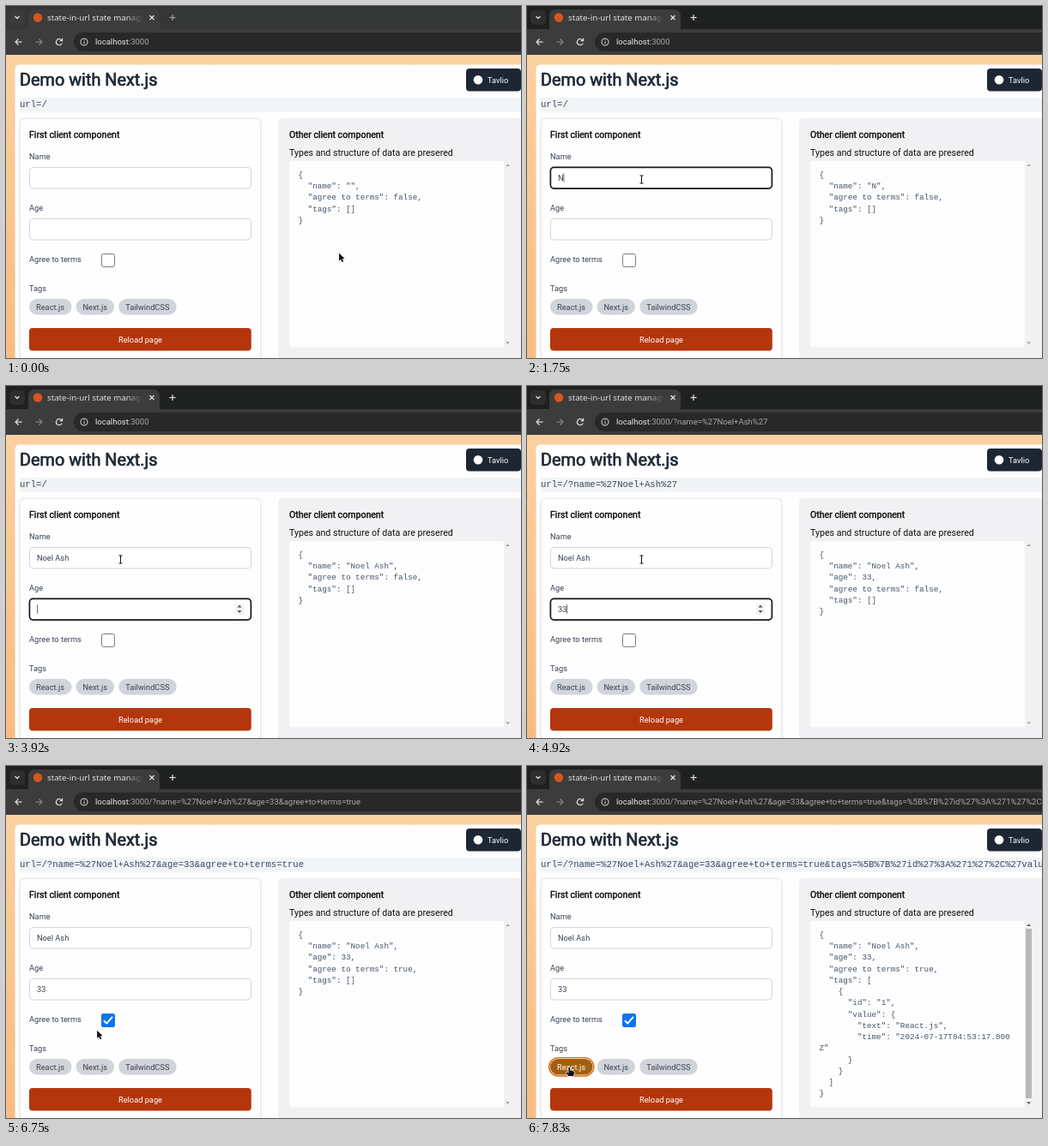
These frames come from a looping animation (600 by 411 pixels, 8000 ms). An HTML page with a canvas:

```html
<!DOCTYPE html>
<html lang="en">
<head>
<meta charset="utf-8">
<title>State in URL demo</title>
<style>
html, body { margin: 0; width: 100%; height: 100%; overflow: hidden; background: #fff; }
canvas { display: block; width: 600px; height: 411px; }
</style>
</head>
<body>
<canvas id="stage"></canvas>
<script>
const LOOP = 8000, STEP = 1000 / 12;
const SANS = 'Roboto, sans-serif', MONO = '"Liberation Mono", monospace';
const INK = '#374151', SLATE = '#475569';
const PERSON = 'Noel Ash';
const NAME_KEYS = [21, 23, 26, 32, 37, 40, 42, 44];
const AGE_KEYS = [55, 57];

// Pointer path: step, x, y
const PATH = [
  [0, 388, 288.4], [6, 156, 211], [7, 156, 211], [9, 133.5, 202.6], [63, 133.5, 202.6],
  [67, 128, 261], [69, 128, 261], [71, 123, 285], [72, 123, 285], [73, 120, 298],
  [79, 120, 298], [86, 50, 352]
];

const canvas = document.getElementById('stage');
const ctx = canvas.getContext('2d');
const ratio = window.devicePixelRatio || 1;
canvas.width = Math.round(600 * ratio);
canvas.height = Math.round(411 * ratio);

function box(x, y, w, h, r, fill, stroke, line = 1) {
  ctx.beginPath();
  ctx.roundRect(x, y, w, h, r);
  if (fill) { ctx.fillStyle = fill; ctx.fill(); }
  if (stroke) { ctx.strokeStyle = stroke; ctx.lineWidth = line; ctx.stroke(); }
}

function disc(x, y, r, fill) {
  ctx.beginPath();
  ctx.arc(x, y, r, 0, 7);
  ctx.fillStyle = fill;
  ctx.fill();
}

function text(str, x, y, size, color, family = SANS) {
  ctx.font = `${size}px ${family}`;
  ctx.fillStyle = color;
  ctx.fillText(str, x, y);
}

// Bold made by thickening the regular outlines
function boldText(str, x, y, size, color) {
  text(str, x, y, size, color);
  ctx.strokeStyle = color;
  ctx.lineWidth = size / 27;
  ctx.lineJoin = 'round';
  ctx.strokeText(str, x, y);
}

function lines(points, color, width = 1.2) {
  ctx.beginPath();
  points.forEach(([x, y], i) => i ? ctx.lineTo(x, y) : ctx.moveTo(x, y));
  ctx.strokeStyle = color;
  ctx.lineWidth = width;
  ctx.stroke();
}

function triangle(x, y, half, rise, color) {
  ctx.beginPath();
  ctx.moveTo(x - half, y);
  ctx.lineTo(x + half, y);
  ctx.lineTo(x, y - rise);
  ctx.fillStyle = color;
  ctx.fill();
}

function pointerAt(k) {
  const i = PATH.findIndex(p => p[0] > k);
  if (i < 0) return PATH[PATH.length - 1].slice(1);
  const [k0, x0, y0] = PATH[i - 1], [k1, x1, y1] = PATH[i];
  const u = (k - k0) / (k1 - k0), e = u * u * (3 - 2 * u);
  return [x0 + (x1 - x0) * e, y0 + (y1 - y0) * e];
}

function stateAt(k) {
  const typed = keys => keys.filter(s => s <= k).length;
  const name = PERSON.slice(0, typed(NAME_KEYS));
  const age = '33'.slice(0, typed(AGE_KEYS));
  const agreed = k >= 76, picked = k >= 88;
  const data = { name };
  if (age) data.age = +age;
  data['agree to terms'] = agreed;
  data.tags = picked
    ? [{ id: '1', value: { text: 'React.js', time: '2024-07-17T04:53:17.000Z' } }]
    : [];
  let query = '';
  if (k >= 50) query += `/?name=%27${PERSON.replace(' ', '+')}%27`;
  if (k >= 78) query += '&age=33&agree+to+terms=true';
  if (k >= 91) query += '&tags=%5B%7B%27id%27%3A%271%27%2C%27value%27%3A%7B%27text%27';
  return {
    name, age, agreed, picked, data, query,
    active: k >= 10,
    focus: k < 10 || k >= 75 ? '' : k < 47 ? 'name' : 'age',
    caret: !(k >= 16 && k < 21) && !(k >= 64 && k < 70),
    pressed: k >= 87
  };
}

function drawBrowser({ query, active }) {
  const icon = active ? '#e3e3e3' : '#a3a3a3';
  ctx.fillStyle = active ? '#1f2020' : '#353636';
  ctx.fillRect(0, 0, 600, 28);
  ctx.fillStyle = '#3c3c3c';
  ctx.fillRect(0, 27, 600, 30);
  box(4, 5, 18, 17, 5, active ? '#2d2e2e' : '#3a3b3b');
  lines([[10.5, 12], [13, 14.5], [15.5, 12]], '#e3e3e3');
  box(26, 4, 153, 26, [7, 7, 0, 0], '#3c3c3c');
  disc(37, 13.5, 5.2, '#d8551f');

  const fade = ctx.createLinearGradient(140, 0, 159, 0);
  fade.addColorStop(0, '#e0e0e0');
  fade.addColorStop(1, 'rgba(224,224,224,0)');
  text('state-in-url state manage', 48, 17, 9.7, fade, '"Noto Sans", sans-serif');
  lines([[167.5, 11], [172.5, 16]], '#e3e3e3');
  lines([[172.5, 11], [167.5, 16]], '#e3e3e3');
  lines([[190.5, 13.5], [197.5, 13.5]], icon);
  lines([[194, 10], [194, 17]], icon);

  lines([[18.5, 42], [11, 42]], '#e3e3e3');
  lines([[14.5, 38.5], [11, 42], [14.5, 45.5]], '#e3e3e3');
  lines([[34.5, 42], [42, 42]], '#858585');
  lines([[38.5, 38.5], [42, 42], [38.5, 45.5]], '#858585');
  ctx.beginPath();
  ctx.arc(62, 42, 3.5, 0.4, 5.6);
  ctx.strokeStyle = '#e3e3e3';
  ctx.lineWidth = 1.2;
  ctx.stroke();
  lines([[65.6, 37.8], [65.6, 40.7], [62.7, 40.7]], '#e3e3e3');

  box(79, 31, 540, 22, 11, '#282828');
  box(87, 38, 8, 8, 4, null, '#d0d0d0', 1.1);
  lines([[91, 41.5], [91, 44.2]], '#d0d0d0', 1.1);
  lines([[91, 39.6], [91, 40.6]], '#d0d0d0', 1.1);
  text('localhost', 104, 45.3, 9.5, '#e8e8e8');
  text(':3000' + query, 104 + ctx.measureText('localhost').width, 45.3, 9.5, '#a8a8a8');
}

function drawPage(query) {
  const peach = ctx.createLinearGradient(0, 58, 0, 411);
  peach.addColorStop(0, '#fbd1a1');
  peach.addColorStop(1, '#f7bc82');
  ctx.fillStyle = peach;
  ctx.fillRect(0, 57, 600, 354);
  box(10.6, 68.5, 620, 380, 5, '#fefefe');
  boldText('Demo with Next.js', 16, 93, 19.85, '#1f2937');
  box(536, 73, 64, 26.4, 4, '#1d2633');
  disc(550, 86.3, 5.3, '#fff');
  text('Tavlio', 561, 90, 9.26, '#fff');
  ctx.fillStyle = '#f1f4f7';
  ctx.fillRect(16, 107, 584, 16.5);
  text('url=' + (query || '/'), 16, 118.3, 10.62, '#3b485b', MONO);

  ctx.save();
  ctx.shadowColor = 'rgba(0,0,0,0.10)';
  ctx.shadowBlur = 4 * ratio;
  ctx.shadowOffsetY = ratio;
  box(16.5, 131.5, 280, 320, 5, '#fefefe');
  ctx.restore();
  box(16.5, 131.5, 280, 320, 5, null, '#e8e9ec');
  box(317, 131, 300, 320, 5, '#f1f1f3');
}

function drawInput(y, value, focused, caret) {
  if (focused) box(27.4, y + 0.4, 258, 24.7, 4, '#fff', '#15171c', 1.7);
  else box(27.5, y + 0.5, 258, 24.5, 4, '#fff', '#d1d5db');
  text(value, 36, y + 16, 9.26, INK);
  if (focused && caret) {
    const x = 36 + ctx.measureText(value).width;
    ctx.fillStyle = '#333';
    ctx.fillRect(x, y + 7.3, 0.7, 10.4);
  }
}

function drawChip(label, x, w, pressed, picked) {
  if (pressed) box(x - 1.4, 340.6, w + 2.8, 21.4, 10.7, '#fff3e2', '#dc6a1c', 1.4);
  const fill = picked ? '#a1600f' : pressed ? '#fdeed9' : '#d1d4da';
  box(x, 342, w, 18.5, 9.25, fill);
  text(label, x + 8, 354.5, 9.26, picked ? '#fff' : INK);
}

function drawForm(s) {
  boldText('First client component', 27, 154, 10.58, '#0b0b0c');
  text('Name', 27, 179, 9.26, INK);
  drawInput(188, s.name, s.focus === 'name', s.caret);
  text('Age', 27, 239, 9.26, INK);
  drawInput(248, s.age, s.focus === 'age', s.caret);
  if (s.focus === 'age') {
    box(267, 254, 10, 13, 0, '#f3f3f3');
    triangle(272, 258.6, 2.6, 2.8, '#4a4a4a');
    triangle(272, 262.2, 2.6, -2.8, '#4a4a4a');
  }
  text('Agree to terms', 27, 299, 9.26, INK);
  if (s.agreed) {
    box(111, 289, 16, 16, 2.2, '#0b74f2');
    lines([[114, 297.3], [117.2, 300.6], [124, 292.8]], '#fff', 2);
  } else {
    box(111.5, 289.5, 15, 15, 2, '#fff', '#7c7c7c');
  }
  text('Tags', 27, 333, 9.26, INK);
  drawChip('React.js', 27, 49.5, s.pressed, s.picked);
  drawChip('Next.js', 81.5, 44.5);
  drawChip('TailwindCSS', 131.3, 67.4);
  box(27, 376, 258.8, 26.4, 4, '#b4360d');
  ctx.textAlign = 'center';
  text('Reload page', 156.5, 392.5, 9.26, '#fff');
  ctx.textAlign = 'left';
}

function drawData(s) {
  boldText('Other client component', 330, 154, 10.58, '#0b0b0c');
  text('Types and structure of data are presered', 330, 175, 10.62, '#111');
  box(330, 181, 250, 217.5, 3, '#fdfdfe');
  if (s.picked) {
    ctx.fillStyle = '#b9b9b9';
    ctx.fillRect(581, 190, 7, 198);
  }
  const arrow = s.picked ? '#5c5c5c' : '#a5a5a5';
  triangle(584.6, 187, 2.5, 2.8, arrow);
  triangle(584.6, 392.2, 2.5, -2.8, arrow);
  JSON.stringify(s.data, null, 2).split('\n')
    .flatMap(row => row.match(/.{1,40}/g))
    .forEach((row, i) => text(row, 340.5, 200 + i * 13.23, 9.26, SLATE, MONO));
}

function cursorShape(d, x, y) {
  const path = new Path2D(d);
  ctx.save();
  ctx.translate(x, y);
  ctx.lineJoin = 'round';
  ctx.lineWidth = 1.3;
  ctx.strokeStyle = '#fff';
  ctx.stroke(path);
  ctx.fillStyle = '#111';
  ctx.fill(path);
  ctx.restore();
}

function drawPointer([x, y]) {
  const inside = (l, t, r, b) => x >= l && x <= r && y >= t && y <= b;
  if (inside(27, 188, 286, 213) || inside(27, 248, 286, 273)) {
    cursorShape('M-2-5H2V-4H.5V4H2V5H-2V4H-.5V-4H-2Z', x, y);
  } else if (inside(111, 289, 127, 305) || inside(27, 342, 76, 360)) {
    cursorShape('M-1.6 0Q-.7-1 .2 0V3.6L4.2 4.4Q5.2 4.8 5 6L4.2 10H-1.6L-4.4 6.4Q-4.6 5.2-3.4 5.4L-1.6 6.6Z', x, y);
  } else {
    cursorShape('M0 0V9.2L2.1 7.3L3.6 10.6L5.2 9.9L3.7 6.6H6.5Z', x, y);
  }
}

function draw(t) {
  const k = Math.floor((t + 5) / STEP);
  const s = stateAt(k);
  ctx.setTransform(ratio, 0, 0, ratio, 0, 0);
  drawPage(s.query);
  drawBrowser(s);
  drawForm(s);
  drawData(s);
  drawPointer(pointerAt(k));
}

function tick() {
  draw(performance.now() % LOOP);
  requestAnimationFrame(tick);
}
tick();
</script>
</body>
</html>
```
